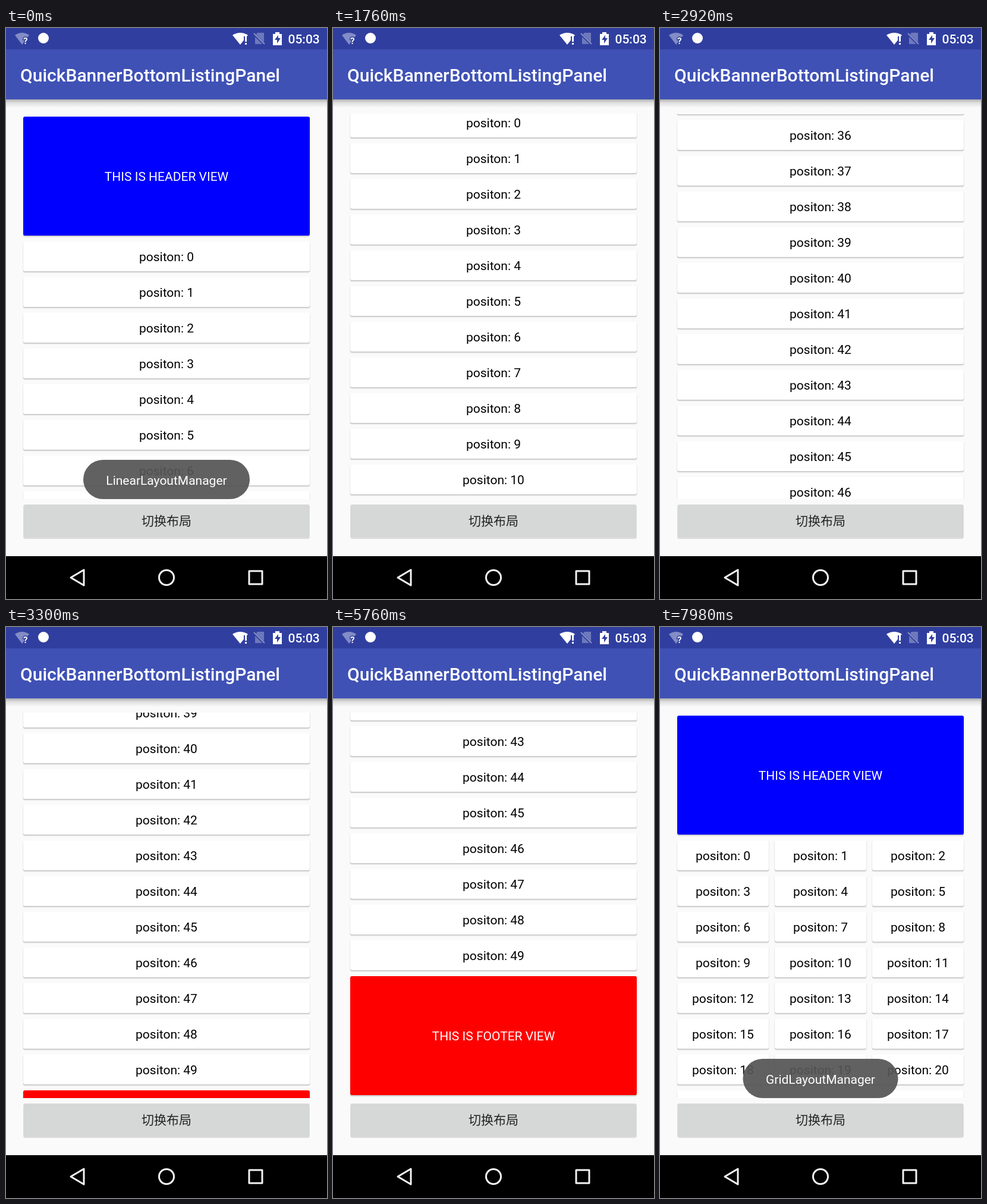
An HTML page that plays this animation: 540 px wide and 960 px high, repeating every 8000 ms.

```html
<!DOCTYPE html>
<html lang="en">
<head>
<meta charset="utf-8">
<title>List layouts</title>
<style>
  html, body { margin: 0; width: 100%; height: 100%; overflow: hidden; background: #000; }
  svg { display: block; }
  text { font: 21px Roboto, sans-serif; }
  .center { text-anchor: middle; }
  .title { font-size: 30px; font-weight: 500; fill: #fff; }
  .clock { font-weight: 500; fill: #fff; }
  .button { font: 500 21px "Noto Sans CJK SC", "Noto Sans CJK", sans-serif; fill: #222; }
</style>
</head>
<body>
<svg width="100%" height="100%" viewBox="0 0 540 960">
  <defs>
    <linearGradient id="barShadow" x2="0" y2="1">
      <stop stop-color="#000" stop-opacity=".3"/>
      <stop offset=".4" stop-color="#000" stop-opacity=".11"/>
      <stop offset="1" stop-color="#000" stop-opacity="0"/>
    </linearGradient>
  </defs>
  <rect width="540" height="960" fill="#fafafa"/>

  <svg x="24" y="144" width="492" height="648" viewBox="24 144 492 648">
    <g id="linear"></g>
    <g id="grid"></g>
    <path id="glow" d="M24 792V744Q270 676 516 744V792Z" fill="#3f51b5" fill-opacity=".22"/>
  </svg>

  <rect x="29" y="801" width="482" height="58" rx="4" opacity=".12"/>
  <rect x="30" y="802" width="480" height="55" rx="3" fill="#d6d7d7"/>
  <text class="center button" x="270" y="836">切换布局</text>

  <rect y="120" width="540" height="14" fill="url(#barShadow)"/>
  <rect width="540" height="120" fill="#3f51b5"/>
  <rect width="540" height="36" fill="#303f9f"/>
  <text class="title" x="24" y="90">QuickBannerBottomListingPanel</text>

  <!-- status icons -->
  <path d="M15 12Q27 4 39 12L27 28Z" fill="#838cc5"/>
  <text x="29" y="27" style="font-size:15px;font-weight:700" fill="#fff" stroke="#303f9f" stroke-width="3" paint-order="stroke">?</text>
  <circle cx="63" cy="17" r="9" fill="#fff"/>
  <path d="M381 12Q394 4 407 12L394 28Z" fill="#fff"/>
  <path d="M400 14h8v15h-8z" fill="#303f9f"/>
  <path d="M402 14h3v9h-3zm0 11h3v3h-3z" fill="#fff"/>
  <path d="M423 8h11v19h-15V13z" fill="#6e79bc"/>
  <path d="M416 9l19 19" stroke="#303f9f" stroke-width="4"/>
  <path d="M417 9l18 18" stroke="#8790c7" stroke-width="2"/>
  <path d="M449 10h4V7h7v3h4v19h-15z" fill="#fff"/>
  <path d="M458 12l-6 8h4v6l6-9h-4z" fill="#303f9f"/>
  <text class="clock" x="474.5" y="26">05:03</text>

  <rect y="888" width="540" height="72"/>
  <g fill="none" stroke="#f4f4f4" stroke-width="3" stroke-linejoin="round">
    <path d="M109 924L131 911V937Z"/>
    <circle cx="270" cy="924" r="12.5"/>
    <path d="M409 913h22v22h-22z"/>
  </g>

  <g id="toast">
    <rect id="toastBox" y="726" height="66" rx="33" fill="#555" fill-opacity=".93"/>
    <text id="toastText" class="center" x="270" y="768" fill="#fff"></text>
  </g>
</svg>
<script>
const LOOP = 8000, SWITCH_AT = 5860, ITEMS = 50;
const byId = id => document.getElementById(id);
const linear = byId('linear'), grid = byId('grid'), glow = byId('glow');
const toast = byId('toast'), toastBox = byId('toastBox'), toastText = byId('toastText');

function card(x, y, width, height, label, fill = '#fff', ink = '#000') {
  const rect = (grow, dy, color) =>
    `<rect x="${x - grow}" y="${y + dy}" width="${width + 2 * grow}" height="${height}" rx="3" fill="${color}"/>`;
  return rect(1, .5, '#ececec') + rect(.5, 2.5, '#e2e2e2') + rect(0, 1.2, '#c4c4c4') + rect(0, 0, fill) +
    `<text class="center" x="${x + width / 2}" y="${y + height / 2 + 8}" fill="${ink}">${label}</text>`;
}

function listOf(columns, width) {
  let out = card(29, 149, 482, 200, 'THIS IS HEADER VIEW', '#00f', '#fff');
  for (let i = 0; i < ITEMS; i++) {
    const row = Math.floor(i / columns);
    out += card(29 + i % columns * (width + 10), 359 + row * 60, width, 50, 'positon: ' + i);
  }
  const footerY = 359 + Math.ceil(ITEMS / columns) * 60;
  return out + card(29, footerY, 482, 200, 'THIS IS FOOTER VIEW', '#f00', '#fff');
}
linear.innerHTML = listOf(1, 482);
grid.innerHTML = listOf(3, 154);

const ramp = (t, from, to) => Math.min(1, Math.max(0, (t - from) / (to - from)));
const easeOut = u => 1 - (1 - u) ** 2;
const easeInOut = u => u * u * (3 - 2 * u);

// start, end, distance
const swipes = [[1300, 1760, 225], [1780, 2360, 1326], [2460, 2920, 813], [3020, 3560, 408]];
const scrollAt = t => swipes.reduce(
  (sum, [from, to, distance]) => sum + distance * easeInOut(ramp(t, from, to)), 0);

function render(now) {
  const t = now % LOOP, isGrid = t >= SWITCH_AT;
  linear.style.display = isGrid ? 'none' : '';
  grid.style.display = isGrid ? '' : 'none';
  linear.setAttribute('transform', `translate(0 ${-Math.round(scrollAt(t))})`);

  const pull = easeOut(ramp(t, 3500, 3820)) * (1 - easeOut(ramp(t, 3880, 4480)));
  glow.setAttribute('transform', `translate(0 ${792 * (1 - pull)}) scale(1 ${pull})`);
  glow.style.opacity = Math.min(1, pull * 1.5);

  const width = isGrid ? 261 : 280;
  toastText.textContent = isGrid ? 'GridLayoutManager' : 'LinearLayoutManager';
  toastBox.setAttribute('x', 270 - width / 2);
  toastBox.setAttribute('width', width);
  toast.style.opacity = isGrid ? ramp(t, 5950, 6350) : 1 - ramp(t, 600, 1000);
}

const start = performance.now();
function tick() {
  render(performance.now() - start);
  requestAnimationFrame(tick);
}
tick();
</script>
</body>
</html>
```
